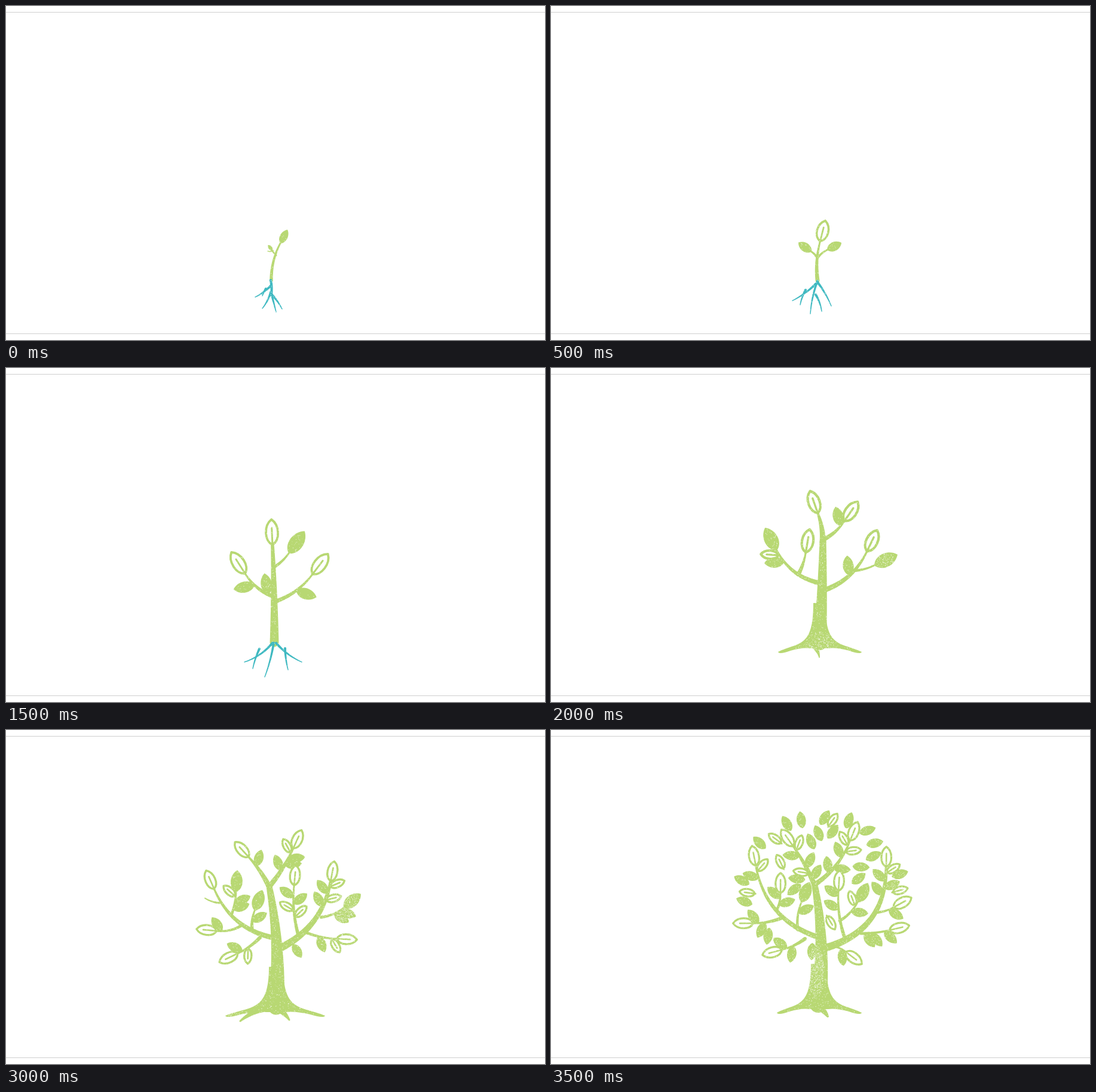
Write an HTML page with a canvas that moves like this. It is 902 px wide and 560 px high and loops after 5500 ms.

```html
<!DOCTYPE html>
<html lang="en">
<head>
<meta charset="utf-8">
<title>Growing tree</title>
<style>
  html, body { margin: 0; width: 100%; height: 100%; overflow: hidden; background: #fff; }
  canvas { display: block; width: 902px; height: 560px; }
</style>
</head>
<body>
<canvas id="stage" width="902" height="560"></canvas>
<script>
const ctx = document.getElementById('stage').getContext('2d');
const GREEN = '#b8d873', TEAL = '#3fb9c1';
const STEP = 500, LOOP = 5500;
let ink, seed, size, line, plump, taken;

function random() {
  seed = (seed * 16807) % 2147483647;
  return seed / 2147483647;
}

// Leaf length, outline weight and width ratio for one scene
function style(length, weight, ratio) {
  size = length;
  line = weight;
  plump = ratio;
}

// Quadratic curve that bulges to the right of its travel when bend > 0
function arc(x0, y0, x1, y1, bend) {
  const dx = x1 - x0, dy = y1 - y0, len = Math.hypot(dx, dy);
  const cx = (x0 + x1) / 2 - dy / len * bend, cy = (y0 + y1) / 2 + dx / len * bend;
  const mix = (a, c, b, t) => (1 - t) * (1 - t) * a + 2 * t * (1 - t) * c + t * t * b;
  return {
    len,
    at: t => [mix(x0, cx, x1, t), mix(y0, cy, y1, t)],
    angle: t => Math.atan2((1 - t) * (cy - y0) + t * (y1 - cy), (1 - t) * (cx - x0) + t * (x1 - cx))
  };
}

function limb(x0, y0, x1, y1, bend, w0, w1) {
  const path = arc(x0, y0, x1, y1, bend), steps = Math.ceil(path.len * 1.5);
  ctx.fillStyle = ink;
  ctx.beginPath();
  for (let i = 0; i <= steps; i++) {
    const t = i / steps, [x, y] = path.at(t), r = (w0 + (w1 - w0) * t) / 2;
    ctx.moveTo(x + r, y);
    ctx.arc(x, y, r, 0, 7);
    if (i % 8 === 0) taken.push([x, y]);
  }
  ctx.fill();
}

const root = (x0, y0, x1, y1, bend) => limb(x0, y0, x1, y1, bend, 4.2, 1.5);

function leaf(x, y, angle, len, filled) {
  ctx.save();
  ctx.translate(x, y);
  ctx.rotate(angle);
  const inset = filled ? 0 : line / 2, h = (len * plump / 2 - inset) / .75;
  ctx.beginPath();
  ctx.moveTo(inset, 0);
  ctx.bezierCurveTo(len * .18, h, len * .74, h, len - inset, 0);
  ctx.bezierCurveTo(len * .74, -h, len * .18, -h, inset, 0);
  ctx.closePath();
  ctx.fillStyle = filled ? ink : '#fff';
  ctx.fill();
  if (!filled) {
    ctx.strokeStyle = ink;
    ctx.lineJoin = ctx.lineCap = 'round';
    ctx.lineWidth = line;
    ctx.stroke();
    ctx.lineWidth = line * .8;
    ctx.beginPath();
    ctx.moveTo(0, 0);
    ctx.lineTo(len * .65, 0);
    ctx.stroke();
  }
  ctx.restore();
  for (const t of [.15, .5, .85]) {
    taken.push([x + Math.cos(angle) * len * t, y + Math.sin(angle) * len * t]);
  }
}

// Leaves are read from the tip down: t = tip, l/r = side, - = gap; capitals are filled
function branch(x0, y0, x1, y1, bend, w, leaves) {
  const path = arc(x0, y0, x1, y1, bend);
  let place = 0;
  limb(x0, y0, x1, y1, bend, w, Math.max(3, w * .38));
  for (const mark of leaves) {
    const kind = mark.toLowerCase(), filled = kind !== mark;
    if (kind === 't') {
      leaf(x1, y1, path.angle(1), size, filled);
      continue;
    }
    const t = Math.max(0, 1 - (.2 + .3 * place++) * size / path.len);
    if (kind === '-') continue;
    leaf(...path.at(t), path.angle(t) + (kind === 'r' ? .95 : -.95), size * .78, filled);
  }
}

// Flared foot with one root to each side
function foot(x, y, w, left, right) {
  const h = w / 2;
  ctx.fillStyle = ink;
  ctx.beginPath();
  ctx.moveTo(x - h, y - 75);
  ctx.bezierCurveTo(x - h, y + 2, x - h - left * .36, y - 10, x - left, y + 7);
  ctx.quadraticCurveTo(x - left + 2, y + 12, x - left * .7, y + 5);
  ctx.quadraticCurveTo(x - left * .4, y - 1, x - 16, y + 1);
  ctx.lineTo(x + 16, y + 1);
  ctx.quadraticCurveTo(x + right * .4, y - 1, x + right * .7, y + 5);
  ctx.quadraticCurveTo(x + right - 2, y + 12, x + right, y + 7);
  ctx.bezierCurveTo(x + h + right * .36, y - 10, x + h, y + 2, x + h, y - 75);
  ctx.fill();
}

// Scatters outward leaves over the free parts of an oval crown
function fillCrown(cx, cy, rx, ry, tries) {
  const len = size * .78;
  for (let i = 0, n = 0; i < tries; i++) {
    const a = random() * Math.PI * 2, r = Math.sqrt(random());
    const x = cx + Math.cos(a) * r * rx, y = cy + Math.sin(a) * r * ry;
    const angle = a + (random() - .5) * 1.4, dx = Math.cos(angle) * len, dy = Math.sin(angle) * len;
    const free = [-.35, 0, .35].every(t =>
      taken.every(([px, py]) => Math.hypot(px - x - dx * t, py - y - dy * t) > 12));
    if (free) leaf(x - dx / 2, y - dy / 2, angle, len, n++ % 4 !== 3);
  }
}

// Worn-stamp specks inside an ellipse
function grain(x, y, rx, ry, density) {
  ctx.fillStyle = 'rgba(255, 255, 255, .65)';
  for (let i = rx * ry * density; i > 0; i--) {
    const a = random() * Math.PI * 2, r = Math.sqrt(random()), s = .6 + random() * .7;
    ctx.fillRect(x + Math.cos(a) * r * rx, y + Math.sin(a) * r * ry, s, s);
  }
}

function sprout() {
  style(26, 3, .5);
  branch(444, 460, 459, 398, -8, 5.5, 'T');
  limb(452, 418, 444, 408, -1, 3, 2);
  limb(447, 410, 438, 411, -2, 2, 1.5);
  leaf(446, 410, -2.25, 12, true);
  ink = TEAL;
  limb(443, 460, 444, 484, -2, 4.5, 4);
  root(443, 469, 417, 488, -3);
  root(435, 474, 429, 486, 1);
  root(443, 480, 429, 507, -3);
  root(444, 482, 452, 513, 0);
  root(445, 484, 462, 508, -2);
  grain(448, 445, 34, 70, .25);
}

function seedling() {
  style(39, 3.6, .58);
  branch(446, 460, 450, 396, -6, 7, 't');
  style(27, 3.6, .56);
  branch(445, 424, 462, 409, -3, 4, 'T');
  branch(444, 420, 436, 412, 1, 4, 'T');
  ink = TEAL;
  root(446, 461, 434, 516, 4);
  root(444, 465, 404, 494, -4);
  root(426, 476, 417, 501, 2);
  root(446, 463, 469, 503, -3);
  root(443, 484, 453, 512, -3);
  grain(445, 440, 40, 75, .2);
}

function shoot() {
  style(58, 4.2, .6);
  limb(447, 460, 446, 366, -6, 10, 7);
  leaf(448, 370, -Math.PI / 2, 58, false);
  limb(446, 368, 450, 338, -1, 7, 3);
  limb(445, 425, 468, 400, -4, 6, 5);
  leaf(466, 405, -.67, 60, false);
  limb(466, 402, 494, 384, -2, 5, 2.5);
  limb(444, 407, 437, 402, 0, 5, 4);
  leaf(439, 405, -2.2, 47, true);
  ink = TEAL;
  root(447, 461, 414, 497, -8);
  root(428, 476, 418, 511, 2);
  root(446, 462, 437, 500, -3);
  root(438, 490, 430, 526, 4);
  root(438, 490, 422, 516, 0);
  root(449, 461, 472, 504, 4);
  root(462, 478, 448, 505, -4);
  root(467, 488, 454, 514, -4);
  grain(455, 400, 60, 90, .2);
}

function sapling() {
  style(46, 3.8, .52);
  branch(449, 460, 446, 298, 2, 15, 't');
  branch(447, 383, 401, 346, -10, 7, 't-L-R');
  branch(449, 392, 512, 347, 12, 7, 't--R');
  branch(450, 333, 473, 311, 3, 5, 'T');
  ink = TEAL;
  root(446, 461, 399, 493, -8);
  root(424, 471, 413, 504, 2);
  root(448, 461, 433, 518, -3);
  root(452, 461, 495, 493, 6);
  root(467, 470, 472, 506, 2);
  grain(455, 385, 80, 120, .15);
}

function youngTree() {
  style(43, 4.2, .54);
  foot(449, 469, 20, 69, 71);
  limb(440, 465, 449, 485, -3, 10, 2);
  limb(450, 462, 455, 290, 2, 22, 11);
  branch(455, 292, 447, 245, 4, 11, 't');
  branch(447, 360, 378, 306, -20, 8, 'TlL');
  branch(414, 346, 426, 311, 3, 7, 't');
  branch(456, 373, 528, 309, 20, 9, 't---L');
  branch(508, 340, 541, 331, 3, 4.5, 'T');
  branch(459, 286, 490, 258, 5, 7, 'tL');
  grain(450, 465, 25, 24, .4);
  grain(557, 322, 18, 12, .4);
  grain(460, 340, 115, 145, .17);
}

function bushyTree() {
  style(39, 3.8, .55);
  foot(448, 463, 22, 71, 70);
  limb(428, 461, 391, 487, 4, 12, 4);
  limb(449, 455, 441, 282, 12, 24, 10);
  branch(442, 284, 423, 255, 2, 10, 't');
  branch(442, 285, 467, 231, 5, 8, 'tRLRL');
  branch(447, 348, 381, 309, -18, 9, 'tLL');
  branch(423, 346, 392, 363, -3, 6, 'Trl');
  branch(416, 343, 412, 297, 5, 6, 'tRLR');
  branch(458, 376, 514, 309, 18, 9, 't');
  branch(485, 357, 480, 305, -6, 6, 'RLR');
  branch(505, 336, 546, 318, 6, 5, 'TR-R');
  grain(445, 425, 18, 45, .35);
  grain(358, 320, 12, 10, .5);
  grain(397, 235, 15, 20, .4);
  grain(460, 345, 115, 148, .17);
}

function broadTree() {
  style(37, 3.4, .54);
  foot(452, 472, 24, 85, 82);
  limb(428, 468, 392, 488, 4, 11, 3);
  limb(456, 468, 474, 486, -3, 12, 3);
  limb(452, 464, 440, 260, 14, 27, 10);
  branch(440, 262, 407, 214, 4, 9, 't-R');
  branch(441, 262, 480, 200, 5, 9, 'tlRRL');
  branch(446, 348, 349, 268, -32, 9, 't');
  limb(357, 290, 333, 282, -3, 3.5, 2);
  branch(377, 311, 385, 272, 3, 5, 'TlRR');
  branch(392, 329, 354, 337, -6, 5, 'tR');
  branch(425, 348, 389, 374, -4, 6, 'tRl');
  branch(412, 336, 416, 303, -4, 6, 'T-R');
  branch(460, 365, 543, 255, 34, 13, 'trLrL');
  branch(490, 347, 482, 262, -8, 6, 't-LRlr');
  branch(503, 340, 552, 350, 4, 5, 'tr-R');
  branch(527, 314, 565, 298, 6, 5, 'TRR');
  leaf(480, 359, 1, 27, true);
  grain(568, 300, 26, 42, .65);
  grain(552, 335, 38, 40, .3);
  grain(385, 473, 19, 9, .5);
  grain(460, 330, 125, 162, .17);
}

function fullTree() {
  style(37, 3.3, .54);
  foot(448, 467, 26, 70, 72);
  limb(446, 463, 463, 480, -3, 14, 4);
  limb(447, 460, 441, 258, 16, 28, 10);
  branch(441, 260, 406, 196, 4, 9, 'trL-RlR');
  branch(443, 258, 500, 187, 14, 8, 'tlrL-RL');
  branch(443, 346, 343, 229, -44, 9, 'trL');
  branch(384, 316, 340, 324, -4, 6, 'tRL');
  branch(378, 302, 384, 275, 3, 5, 'tLR');
  branch(413, 335, 419, 289, -6, 5, 'T-R');
  branch(425, 350, 388, 368, -4, 6, 'tRL');
  branch(460, 365, 561, 231, 62, 13, 'trLRL');
  branch(492, 350, 481, 271, -8, 6, 'tL-L');
  branch(483, 320, 513, 289, 6, 5, 'TlR');
  branch(518, 341, 565, 336, 3, 5, 'tR-RR');
  branch(545, 306, 572, 298, 3, 4.5, 'tR');
  branch(475, 363, 492, 371, -2, 4, 'tR');
  fillCrown(452, 262, 134, 118, 4000);
  grain(443, 405, 13, 45, .9);
  grain(585, 262, 18, 12, .4);
  grain(452, 305, 150, 182, .2);
}

const scenes = [sprout, seedling, shoot, sapling, youngTree, bushyTree, broadTree, fullTree];
let shown = -1;

function draw(index) {
  ctx.fillStyle = '#fff';
  ctx.fillRect(0, 0, 902, 560);
  ctx.fillStyle = '#cfcfcf';
  ctx.fillRect(0, 10, 902, 1);
  ctx.fillRect(0, 549, 902, 1);
  ink = GREEN;
  seed = 41 + index * 977;
  taken = [];
  scenes[index]();
}

const start = performance.now();
function tick() {
  const time = (performance.now() - start) % LOOP;
  const index = Math.min(scenes.length - 1, Math.floor(time / STEP));
  if (index !== shown) draw(shown = index);
  requestAnimationFrame(tick);
}
tick();
</script>
</body>
</html>
```
